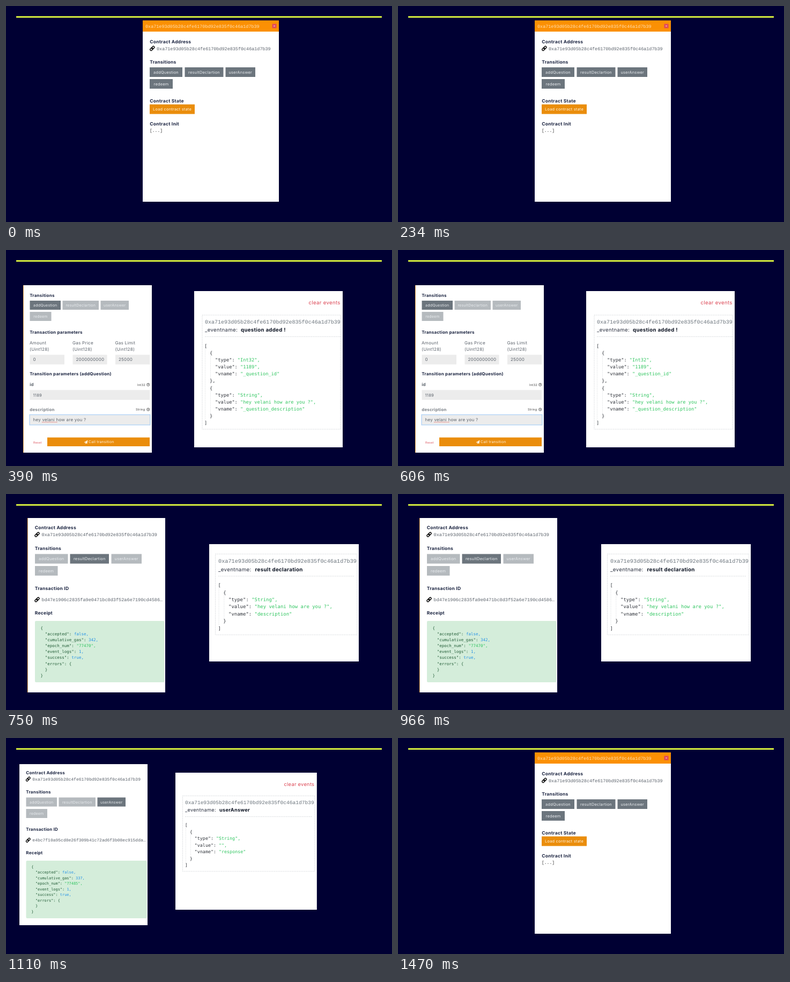
Recreate the animation shown at these times as an HTML page. Size 720 by 405 pixels, loop 1.5 s.

```html
<!DOCTYPE html>
<html lang="en">
<head>
<meta charset="utf-8">
<title>Contract walkthrough</title>
<style>
  html, body { margin: 0; width: 100%; height: 100%; overflow: hidden; background: #000033; }
  svg { display: block; width: 100vw; height: 100vh; }
  text { font-family: Inter, sans-serif; letter-spacing: .03em; white-space: pre; text-rendering: geometricPrecision; }
  .courier { font-family: "Liberation Mono", monospace; letter-spacing: 0; }
  .code { font-family: "DejaVu Sans Mono", monospace; letter-spacing: 0; }
</style>
</head>
<body>
<svg id="stage" viewBox="0 0 720 405"></svg>
<script>
const ADDRESS = '0xa71e93d05b28c4fe6170bd92e835f0c46a1d7b39';
const GREETING = 'hey velani how are you ?';
const NAVY = '#1b2440', GREY = '#6c757d', FADED = '#b5babe', ORANGE = '#ea8d0c', RED = '#dc4755';
const FIELD = '#ececec', BODY = '#5b626b', GREEN = '#2fc55f', BLUE = '#2492e6';

// All text is placed by its vertical centre.
const text = (x, cy, size, str, fill = BODY, attrs = '') =>
  `<text x="${x}" y="${cy + size * .36}" font-size="${size}" fill="${fill}" ${attrs}>${str}</text>`;
const bold = (x, cy, size, str, fill = NAVY) => text(x, cy, size, str, fill, 'font-weight="650"');
const courier = (x, cy, size, str, fill = BODY) => text(x, cy, size, str, fill, 'class="courier"');
const rect = (x, y, right, bottom, fill, attrs = '') =>
  `<rect x="${x}" y="${y}" width="${right - x}" height="${bottom - y}" fill="${fill}" ${attrs}/>`;
const dashed = (d, color = '#cfd2d6') =>
  `<path d="${d}" fill="none" stroke="${color}" stroke-width=".8" stroke-dasharray="2 1.3"/>`;

const button = (x, y, right, bottom, size, label, fill = GREY, color = '#e9ecef') =>
  rect(x, y, right, bottom, fill) +
  text((x + right) / 2, (y + bottom) / 2, size, label, color, 'text-anchor="middle"');

// Buttons given as [left, right, row, label]; only the active one is dark.
const transitions = (rows, height, size, items, active) => items.map(([x, right, row, label]) =>
  button(x, rows[row], right, rows[row] + height, size, label,
    active && label !== active ? FADED : GREY)).join('');

const link = (cx, cy, scale = 1) =>
  `<g transform="translate(${cx} ${cy}) rotate(-45) scale(${scale})" fill="none" stroke="#111" stroke-width="1.5">
    <rect x="-4.9" y="-1.9" width="5.8" height="3.8" rx="1.9"/>
    <rect x="-.9" y="-1.9" width="5.8" height="3.8" rx="1.9"/></g>`;

const help = (cx, cy) =>
  `<circle cx="${cx}" cy="${cy}" r="2.6" fill="none" stroke="#444" stroke-width=".8"/>` +
  text(cx, cy, 4.4, '?', '#333', 'text-anchor="middle" font-weight="700" letter-spacing="0"');

// Prints JSON lines with coloured values; guides join matching brackets.
function json({ x, y, size, step, indent, lines, color = '#30343b', guides = true }) {
  const open = [];
  let depth = 0, out = '';
  lines.forEach((line, i) => {
    const cy = y + i * step;
    if (/^[}\]]/.test(line)) {
      depth--;
      const top = open.pop() + 6, gx = x + depth * indent + 1.5;
      if (guides) out += dashed(`M${gx} ${top}V${cy - 5}`, '#dfe1e4');
    }
    const [, key, value] = line.match(/^("\w+": )?(.*)$/);
    const fill = !key || value === '{' ? color : value[0] === '"' ? GREEN : BLUE;
    out += text(x + depth * indent, cy, size,
      `${key || ''}<tspan fill="${fill}">${value}</tspan>`, color, 'class="code"');
    if (/[{[]$/.test(line)) { open.push(cy); depth++; }
  });
  return out;
}
const entry = (type, value, name) =>
  ['{', `"type": "${type}",`, `"value": "${value}",`, `"vname": "${name}"`, '}'];
const receipt = (gas, epoch) => ['{', '"accepted": false,', `"cumulative_gas": ${gas},`,
  `"epoch_num": "${epoch}",`, '"event_logs": 1,', '"success": true,', '"errors": {', '}', '}'];

const overview = () =>
  rect(255, 27, 509, 367, '#fff') + rect(255, 27, 509, 48, '#fb9004') +
  courier(260, 37.5, 8.45, ADDRESS, '#ffe0b5') +
  rect(496.5, 33.5, 504.5, 41.5, '#e0485a') +
  '<path d="M499 36l3 3m0-3l-3 3" stroke="#fbd5d9" stroke-width=".8"/>' +
  bold(268.2, 66.5, 8.5, 'Contract Address') +
  link(272.8, 79.5) + courier(281, 79.5, 8.45, ADDRESS) +
  bold(268.2, 104.5, 8.5, 'Transitions') +
  transitions([115, 137], 18, 7.4, [[268, 329, 0, 'addQuestion'], [333.5, 405.5, 0, 'resultDeclartion'],
    [409.5, 465, 0, 'userAnswer'], [268, 311, 1, 'redeem']]) +
  bold(268.2, 178, 8.5, 'Contract State') +
  button(268, 184.5, 352, 202.5, 7.4, 'Load contract state', ORANGE, '#fff3df') +
  bold(268.2, 221, 8.5, 'Contract Init') +
  courier(268, 233, 8, '[...]', '#333');

const parameter = (x, right, label, value) =>
  text(x - .5, 174, 8.1, label) + text(x - .5, 186, 8.1, '(Uint128)') +
  rect(x, 196.5, right, 214.5, FIELD) + text(x + 6, 205.5, 8, value);

const addQuestion = () =>
  rect(32, 66, 272, 380, '#fff') + rect(32, 66, 33, 380, '#f7b75c') +
  bold(44.2, 85, 8, 'Transitions') +
  transitions([95, 116], 17, 7, [[44.5, 102, 0, 'addQuestion'], [105.5, 173, 0, 'resultDeclartion'],
    [176.5, 229, 0, 'userAnswer'], [44.5, 84.5, 1, 'redeem']], 'addQuestion') +
  bold(44.2, 154, 8, 'Transaction parameters') +
  parameter(44.5, 109, 'Amount', '0') + parameter(124.5, 188.5, 'Gas Price', '2000000000') +
  parameter(204, 268, 'Gas Limit', '25000') +
  bold(44.2, 232, 8, 'Transition parameters (addQuestion)') +
  bold(44.2, 252, 8, 'id', BODY) + text(245, 252.5, 5.8, 'Int32', '#444') + help(265.2, 252.5) +
  rect(44.5, 262.5, 268, 281, FIELD) + text(50.5, 272, 7.6, '1189') +
  bold(44.2, 299, 7.9, 'description', '#7b8087') + text(242, 299, 5.8, 'String', '#444') + help(265.2, 299) +
  rect(44, 308.8, 269, 328, FIELD, 'stroke="#b3d4f7" stroke-width="1.4"') +
  text(50.5, 318.5, 8, GREETING) +
  '<path d="M67 322.8H96" stroke="#e2574c" stroke-width=".9" stroke-dasharray="1.2 .6"/>' +
  text(51, 360.5, 5.6, 'Reset', '#dd5c66') +
  rect(77, 351.5, 268, 368, ORANGE) + text(154, 360, 6.9, 'Call transition', '#fff3df') +
  '<path d="M145.5 360.5l7-4-1.2 6.8-2.3-1-1.3 1.5v-2.2l3.2-3.4-3.8 3z" fill="#fff3df"/>' +
  rect(351, 77, 628, 370, '#fff') + text(564.5, 98.5, 9.7, 'clear events', RED) +
  dashed('M366 122H624V336H366Z') + dashed('M371 162.5H624') +
  courier(371, 134, 10.04, ADDRESS, GREY) +
  text(371, 149.5, 9.7, '_eventname:', '#2b3140') + bold(438, 149.5, 9.7, 'question added !', '#0e1524') +
  json({ x: 370, y: 179.5, size: 8.7, step: 13.15, indent: 10, lines: ['[',
    ...entry('Int32', '1189', '_question_id').map(line => line === '}' ? '},' : line),
    ...entry('String', GREETING, '_question_description'), ']'] });

const resultDeclaration = () =>
  rect(40, 45, 297, 372, '#fff') + rect(40, 45, 41, 372, '#f7b75c') +
  bold(53.8, 63, 8.5, 'Contract Address') +
  link(58, 76) + courier(66.5, 76, 8.56, ADDRESS) +
  bold(53.8, 101.5, 8.5, 'Transitions') +
  transitions([112.5, 135], 18, 7.5, [[54, 115.5, 0, 'addQuestion'], [119.5, 192, 0, 'resultDeclartion'],
    [196.5, 253, 0, 'userAnswer'], [54, 96.5, 1, 'redeem']], 'resultDeclartion') +
  bold(53.8, 176.5, 8.5, 'Transaction ID') +
  link(58, 198) + courier(66.5, 198, 8.56, 'bd47e1906c2835fa9e0471bc8d3f52a6e7190cd4586…') +
  bold(53.8, 223, 8.5, 'Receipt') +
  rect(54, 238, 295.5, 353, '#d4edda', 'rx="2"') +
  json({ x: 64.5, y: 251, size: 7.5, step: 11.15, indent: 8.2, color: '#215c36', guides: false,
    lines: receipt(342, 77470) }) +
  rect(379, 94, 658, 314, '#fff') +
  dashed('M390.5 112.5H655V264H390.5Z') + dashed('M396 154H650') +
  courier(396, 125.5, 10.24, ADDRESS, GREY) +
  text(396, 141, 9.8, '_eventname:', '#2b3140') + bold(464.5, 141, 9.8, 'result declaration', '#0e1524') +
  json({ x: 395.5, y: 171, size: 8.95, step: 13.4, indent: 9.8,
    lines: ['[', ...entry('String', GREETING, 'description'), ']'] });

const userAnswer = () =>
  rect(25, 49, 264, 351, '#fff') +
  bold(37.3, 65, 8, 'Contract Address') +
  link(41.3, 77, .95) + courier(49.3, 77, 8, ADDRESS) +
  bold(37.3, 101, 8, 'Transitions') +
  transitions([111.5, 133], 17, 7, [[37.5, 95, 0, 'addQuestion'], [98.5, 167, 0, 'resultDeclartion'],
    [170.5, 223, 0, 'userAnswer'], [37.5, 77, 1, 'redeem']], 'userAnswer') +
  bold(37.3, 171.5, 8, 'Transaction ID') +
  link(41.3, 191.5, .95) + courier(49.3, 191.5, 8, 'e4bc7f10a95cd8e26f309b41c72ad6f3b08ec915dda…') +
  bold(37.3, 215.5, 8, 'Receipt') +
  rect(37.5, 230, 263, 338, '#d4edda', 'rx="2"') +
  json({ x: 47.3, y: 241, size: 6.95, step: 10.55, indent: 7.6, color: '#215c36', guides: false,
    lines: receipt(337, 77485) }) +
  rect(316, 65, 580, 322, '#fff') + rect(579, 65, 580, 322, '#d5d5dc') +
  text(518.5, 86.5, 9.3, 'clear events', RED) +
  dashed('M329.5 108.5H576V250H329.5Z') + dashed('M334 147.5H571') +
  courier(334, 120.5, 9.56, ADDRESS, GREY) +
  text(334, 135, 9.2, '_eventname:', '#2b3140') + bold(398, 135, 9.2, 'userAnswer', '#0e1524') +
  json({ x: 333.8, y: 163, size: 8.35, step: 12.5, indent: 9,
    lines: ['[', ...entry('String', '', 'response'), ']'] });

const LOOP = 1500;
const SCENES = [[0, overview], [390, addQuestion], [750, resultDeclaration], [1110, userAnswer], [1470, overview]];

const stage = document.getElementById('stage');
stage.innerHTML = rect(0, 0, 720, 405, '#000033') + rect(19, 19, 701, 22, '#d3ea3d') +
  SCENES.map(([, draw]) => `<g class="scene">${draw()}</g>`).join('');
const groups = [...stage.querySelectorAll('.scene')];

const start = performance.now();
function show() {
  const time = (performance.now() - start) % LOOP;
  const current = SCENES.findLastIndex(([from]) => time >= from);
  groups.forEach((group, i) => { group.style.display = i === current ? '' : 'none'; });
  requestAnimationFrame(show);
}
show();
</script>
</body>
</html>
```
